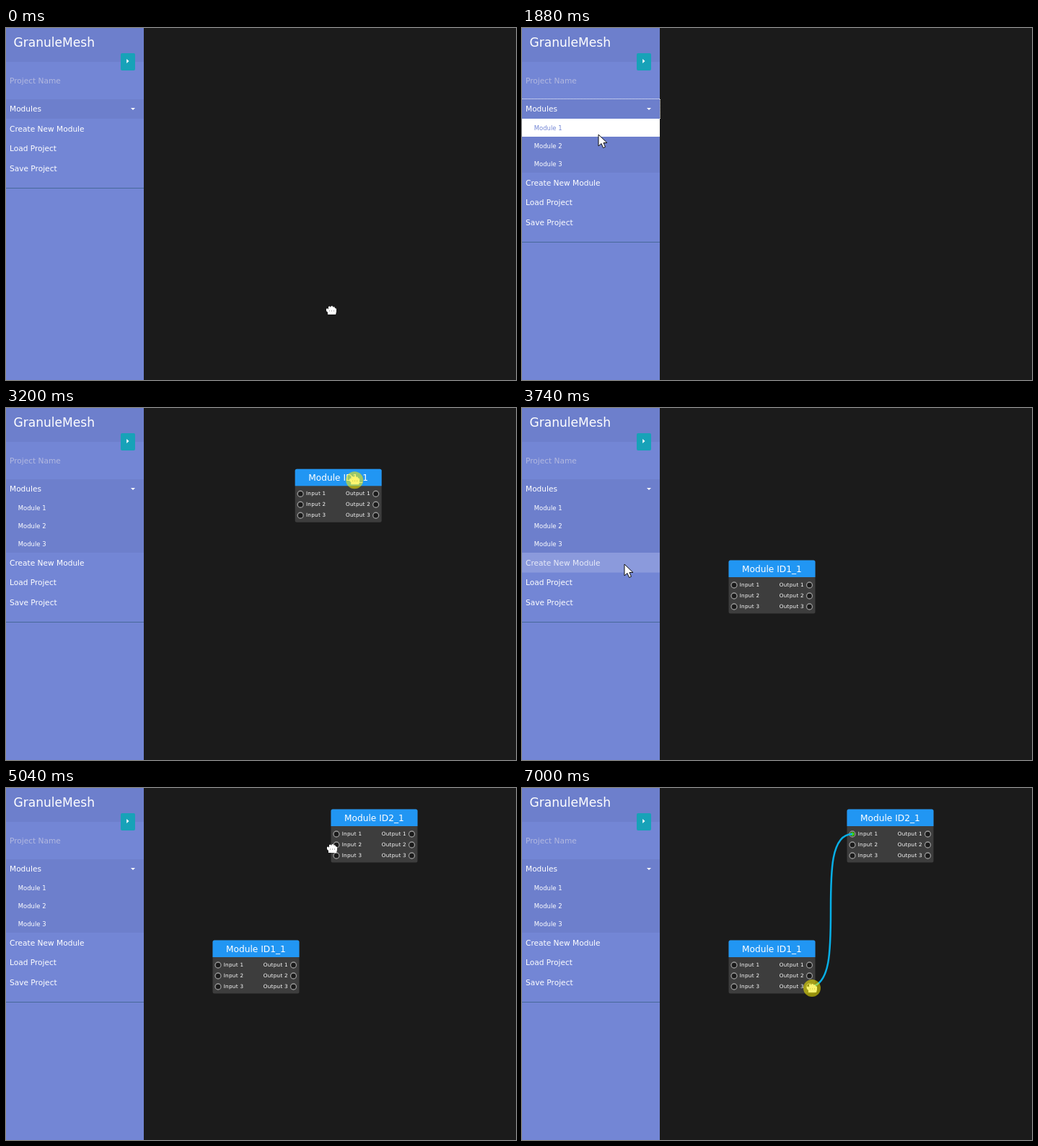
These frames come from a looping animation (707x489 px, 8000 ms). An HTML page:

```html
<!DOCTYPE html>
<html lang="en">
<head>
<meta charset="utf-8">
<title>Module editor</title>
<style>
html, body { margin: 0; width: 100%; height: 100%; overflow: hidden; background: #1b1b1b; }
svg { display: block; width: 707px; height: 489px; }
text { font: 10.6px "DejaVu Sans", sans-serif; fill: #fff; white-space: pre; }
.brand { font-size: 17.1px; }
.sub { font-size: 8.45px; }
.title { font-size: 12.2px; text-anchor: middle; }
.label { font-size: 7.2px; letter-spacing: .3px; }
.end { text-anchor: end; }
.port { fill: #1b1b1b; stroke: #989898; stroke-width: 1.3; }
.glyph { fill: #fff; stroke: #111; stroke-linejoin: round; }
</style>
</head>
<body>
<svg viewBox="0 0 707 489">
  <rect width="191" height="489" fill="#7386d5"/>
  <rect width="191" height="47" fill="#6d7fcc"/>
  <text class="brand" x="10.4" y="26">GranuleMesh</text>
  <rect x="159" y="35" width="20" height="24" rx="2" fill="#17a2b8"/>
  <path d="M167.2 43L170.5 46L167.2 49Z" fill="#fff"/>
  <text x="5" y="77" style="fill:#b2b8e0">Project Name</text>

  <rect id="menu" y="99" width="191" fill="#6d7fcc"/>
  <text x="5" y="116">Modules</text>
  <path d="M173 111H179L176 114Z" fill="#fff"/>
  <clipPath id="fold"><rect id="foldBox" y="126" width="191"/></clipPath>
  <g id="subs" clip-path="url(#fold)"></g>
  <g id="items"><path d="M0 222.5H191" stroke="#47699a"/></g>
  <path id="focus" d="M0 98.5H191.5V126" fill="none" stroke="#fff" stroke-dasharray="1 1"/>

  <g id="nodes"></g>
  <g id="link">
    <circle cx="458" cy="64" r="2.8" fill="#3fd511"/>
    <path id="wire" fill="none" stroke="#08afe6" stroke-width="2.5"/>
  </g>

  <g id="cursor">
    <path id="arrow" class="glyph" d="M0 0V16L4 12.5L6.5 18.5L9.5 17.2L7 11.5H12Z"/>
    <g id="fist">
      <path d="M-5 6V3L-7 1V-2L-5 -2.5L-4 -1V-5L-2 -5.5L-1 -4L0 -6L2 -5.5L2.5 -4L4 -5L5 -3L7 -2V2L6 6Z" fill="#fff"/>
      <path d="M-3 1H6" stroke="#777" stroke-dasharray="1 2"/>
    </g>
    <g id="pointer">
      <path class="glyph" d="M-2 9L-6 3L-5 1L-2 3V-5L0 -6L1 -4V0L4 -.5L7 .5L8 2V6L7 9Z"/>
      <path d="M-4 0V-5L-1 -6.5L1 -5" fill="none" stroke="#2fc52f"/>
    </g>
    <circle id="ring" r="12" fill="#f7ee00" opacity=".56"/>
  </g>
</svg>
<script>
const LOOP = 8000, SIDEBAR = 191, FADE = 300;
const DRAG = [3040, 3480];
const $ = id => document.getElementById(id);
const clamp = (v, lo = 0, hi = 1) => Math.min(hi, Math.max(lo, v));
const ease = (t, a, b) => { const k = clamp((t - a) / (b - a)); return k * k * (3 - 2 * k); };
const show = (el, on) => el.setAttribute("display", on ? "inline" : "none");
const move = (el, x, y) => el.setAttribute("transform", `translate(${x} ${y})`);

function add(parent, tag, attrs, text) {
  const el = document.createElementNS("http://www.w3.org/2000/svg", tag);
  for (const k in attrs) el.setAttribute(k, attrs[k]);
  if (text) el.textContent = text;
  parent.append(el);
  return el;
}

// Mouse moves: start, end, destination; it rests in between
const moves = [
  [70, 650, 180, 115],
  [1150, 1880, 106, 148],
  [1980, 2110, 91, 170],
  [2420, 2660, 503, 94],
  [2660, 2890, 533, 45],
  [...DRAG, 369, 227],
  [3600, 3740, 142, 217],
  [3740, 4160, 101, 168],
  [4560, 5040, 452, 84],
  [5040, 5360, 462, 65],
  [5680, 6450, 420, 259],
  [6520, 7000, 402, 278]
];
function mouse(t) {
  let x = 451, y = 392;
  for (const [a, b, toX, toY] of moves) {
    const k = ease(t, a, b);
    x += (toX - x) * k;
    y += (toY - y) * k;
  }
  return [x, y];
}
const clicks = [880, 1920, 4240];
const pressed = t => t >= 5680 || (t >= DRAG[0] && t < DRAG[1]) || clicks.some(c => t >= c && t < c + 80);
const opening = t => 75 * ease(t, 1011, 1361);

// Menu rows; those below the submenu slide down with it
const rows = [];
function addRow(name, i, inSub) {
  const h = inSub ? 25 : 27.6;
  const top = 126 + i * h;
  const parent = inSub ? $("subs") : $("items");
  const box = add(parent, "rect", { y: top, width: SIDEBAR, height: h, fill: "#fff" });
  const text = add(parent, "text", {
    class: inSub ? "sub" : "", x: inSub ? 16.8 : 5, y: Math.round(top + h / 2 + (inSub ? 3.4 : 4))
  }, name);
  const isOver = t => {
    const [x, y] = mouse(t), open = opening(t);
    const dy = y - top - (inSub ? 0 : open);
    return x < SIDEBAR && dy >= 0 && dy < h && (!inSub || y < 126 + open);
  };
  rows.push({ box, text, isOver });
}
["Module 1", "Module 2", "Module 3"].forEach((name, i) => addRow(name, i, true));
["Create New Module", "Load Project", "Save Project"].forEach((name, i) => addRow(name, i, false));

// A linear fade equals the share of the last FADE ms spent over the row
function hover(row, t, steps = 30) {
  let n = 0;
  for (let i = 0; i < steps; i++) n += row.isOver(t - FADE * i / steps);
  return n / steps;
}

function node(name) {
  const g = add($("nodes"), "g", {});
  add(g, "rect", { x: .5, y: .5, width: 120, height: 74, rx: 2.5, fill: "#3d3d3d" });
  add(g, "path", { d: "M.5 24V3Q.5 .5 3 .5H118Q120.5 .5 120.5 3V24Z", fill: "#2196f3" });
  add(g, "text", { class: "title", x: 60.4, y: 17 }, name);
  for (let i = 1; i <= 3; i++) {
    const cy = 20 + 15 * i;
    for (const cx of [8, 112.5]) add(g, "circle", { class: "port", cx, cy, r: 4 });
    add(g, "text", { class: "label", x: 15.7, y: cy + 2 }, `Input ${i}`);
    add(g, "text", { class: "label end", x: 105, y: cy + 2 }, `Output ${i}`);
  }
  return g;
}
const first = node("Module ID1_1");
const second = node("Module ID2_1");
move(second, 450, 29);

function draw(t) {
  const open = opening(t);
  $("menu").setAttribute("height", 27 + open);
  $("foldBox").setAttribute("height", open);
  move($("items"), 0, open);
  show($("focus"), t >= 880 && t < 1960);

  for (const row of rows) {
    const a = hover(row, t);
    row.box.setAttribute("opacity", a);
    row.text.style.fill = `rgb(${255 - 140 * a},${255 - 121 * a},${255 - 42 * a})`;
  }

  const [x, y] = mouse(t);
  const [dragX, dragY] = mouse(clamp(t, ...DRAG));
  show(first, t >= 2000);
  move(first, dragX - 83, dragY - 16);
  show(second, t >= 4330);

  show($("link"), t >= 5680);
  const endX = x - 4, endY = y - 2;
  $("wire").setAttribute("d", `M458 64C${endX} 64 458 ${endY} ${endX} ${endY}`);

  const inMenu = x < SIDEBAR, pointing = t < 1150;
  move($("cursor"), x, y);
  show($("pointer"), inMenu && pointing);
  show($("arrow"), inMenu && !pointing);
  show($("fist"), !inMenu);
  show($("ring"), pressed(t));
}

const start = performance.now();
function frame() {
  draw((performance.now() - start) % LOOP);
  requestAnimationFrame(frame);
}
frame();
</script>
</body>
</html>
```
